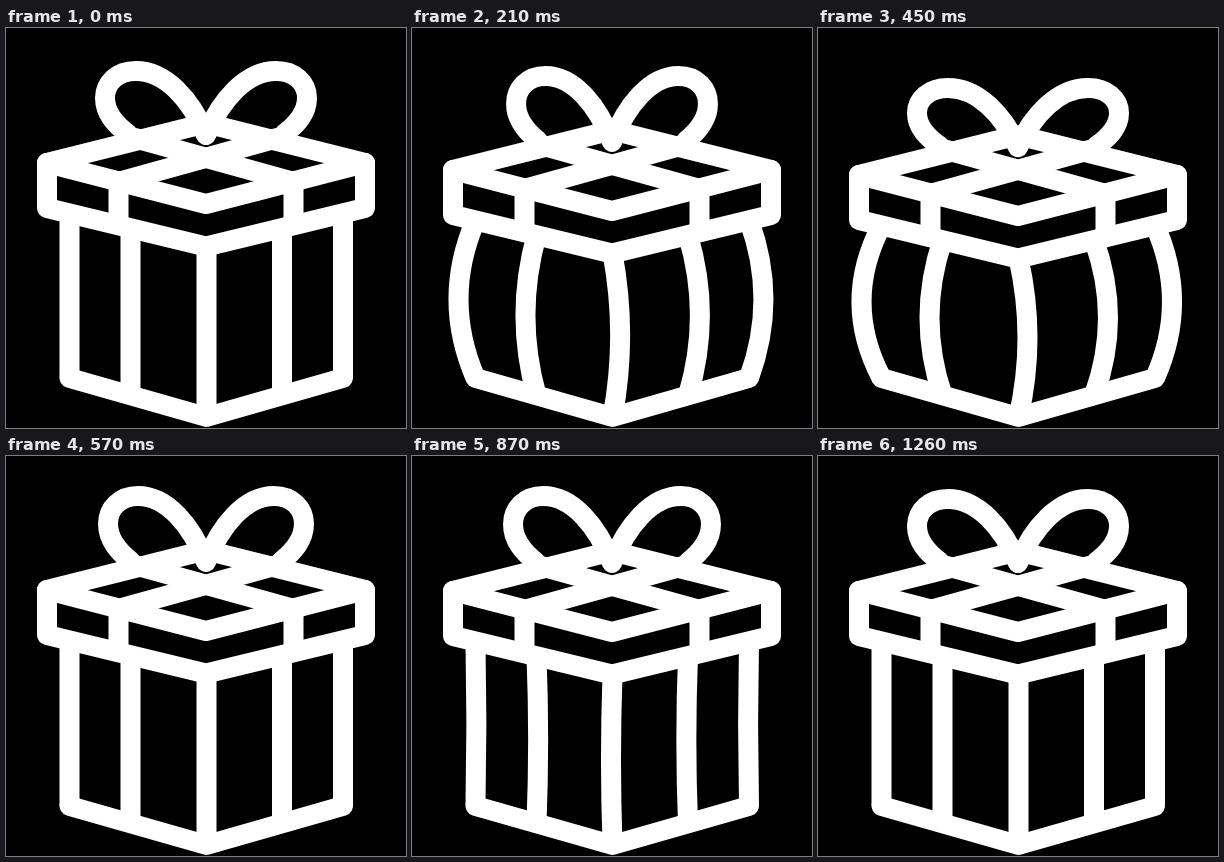
An HTML page for the animation above (3320 ms loop, 400 by 400 pixels).

```html
<!DOCTYPE html>
<html lang="en">
<head>
<meta charset="utf-8">
<title>Gift box</title>
<style>
  html, body { margin: 0; width: 100%; height: 100%; overflow: hidden; background: #000; }
  svg { display: block; width: 100%; height: 100%; }
  path { fill: none; stroke: #fff; stroke-width: 20; stroke-linejoin: round; stroke-linecap: round; }
  #walls { stroke-linecap: butt; }
</style>
</head>
<body>
<svg viewBox="0 0 400 400">
  <path id="walls"/>
  <path d="M63.5 350 L200.5 389 L337 350"/>
  <g id="lid">
    <path d="M41 135 L200 95.3 L359 135 V180 L200 218.5 L41 180 Z"/>
    <path d="M41 135 L200 176 L359 135"/>
    <path d="M112.5 197 V154 L271.5 110 M287.5 197 V154 L128.5 110"/>
  </g>
  <path id="bow"/>
</svg>
<script>
const LOOP = 3320, STEP = 30, END = 1260;

// time, lid drop, bow top, bow width, wall bend
const KEYS = [
  [0, 0, 33, 1, 0],
  [210, 7, 38, 0.95, 0.85],
  [390, 13, 49, 0.98, 1.02],
  [450, 12, 50, 1, 1],
  [570, -1, 30, 0.97, 0],
  [690, -15, 5, 0.95, -1],
  [870, 0, 30, 0.98, -0.15],
  [1020, 3, 35, 0.98, 0.03],
  [1140, -0.5, 31, 0.995, 0],
  [END, 0, 33, 1, 0]
];

// x, foot y, bulge outward, pinch inward
const WALLS = [
  [63.5, 350, -20, 6],
  [124.5, 367.5, -13, 11],
  [200.5, 389, 9, -10],
  [276, 367.5, 14, -11],
  [337, 350, 17, -6]
];

// one loop of the bow, drawn from the knot
const LOOP_PTS = [
  [200, 107], [185, 72], [160, 43], [130, 43],
  [111, 43], [99, 55], [99, 70],
  [99, 86], [110, 97], [122, 106]
];

const el = id => document.getElementById(id);
const walls = el('walls'), lid = el('lid'), bow = el('bow');

function slope(i, c) {
  const a = KEYS[i - 1], b = KEYS[i], d = KEYS[i + 1];
  if (!a || !d) return 0;
  const s0 = (b[c] - a[c]) / (b[0] - a[0]);
  const s1 = (d[c] - b[c]) / (d[0] - b[0]);
  return s0 * s1 <= 0 ? 0 : 2 * s0 * s1 / (s0 + s1);
}

function value(t, c) {
  let i = 0;
  while (i < KEYS.length - 2 && t >= KEYS[i + 1][0]) i++;
  const a = KEYS[i], b = KEYS[i + 1], h = b[0] - a[0];
  const u = (t - a[0]) / h, v = 1 - u;
  return v * v * (1 + 2 * u) * a[c] + u * u * (3 - 2 * u) * b[c]
    + h * u * v * (v * slope(i, c) - u * slope(i + 1, c));
}

function wallPath(drop, bend) {
  return WALLS.map(([x, foot, bulge, pinch]) => {
    const top = 218.5 - 0.242 * Math.abs(x - 200) + drop;
    const off = bend > 0 ? bend * bulge : -bend * pinch;
    return `M${x} ${top} Q${x + 2 * off} ${(top + foot) / 2} ${x} ${foot}`;
  }).join(' ');
}

function bowPath(drop, top, width) {
  const base = 110 + drop;
  const tall = (base - top - 10) / 67;
  return [1, -1].map(side => {
    const p = LOOP_PTS.map(([x, y]) =>
      `${200 + side * (x - 200) * width} ${base + (y - 110) * tall}`);
    return `M${p[0]} C${p.slice(1).join(' ')}`;
  }).join(' ');
}

function draw(time) {
  const t = Math.min(END, Math.floor((time % LOOP) / STEP) * STEP);
  const [drop, top, width, bend] = [1, 2, 3, 4].map(c => value(t, c));
  lid.setAttribute('transform', `translate(0 ${drop})`);
  walls.setAttribute('d', wallPath(drop, bend));
  bow.setAttribute('d', bowPath(drop, top, width));
}

const start = performance.now();
function tick() {
  draw(performance.now() - start);
  requestAnimationFrame(tick);
}
tick();
</script>
</body>
</html>
```
